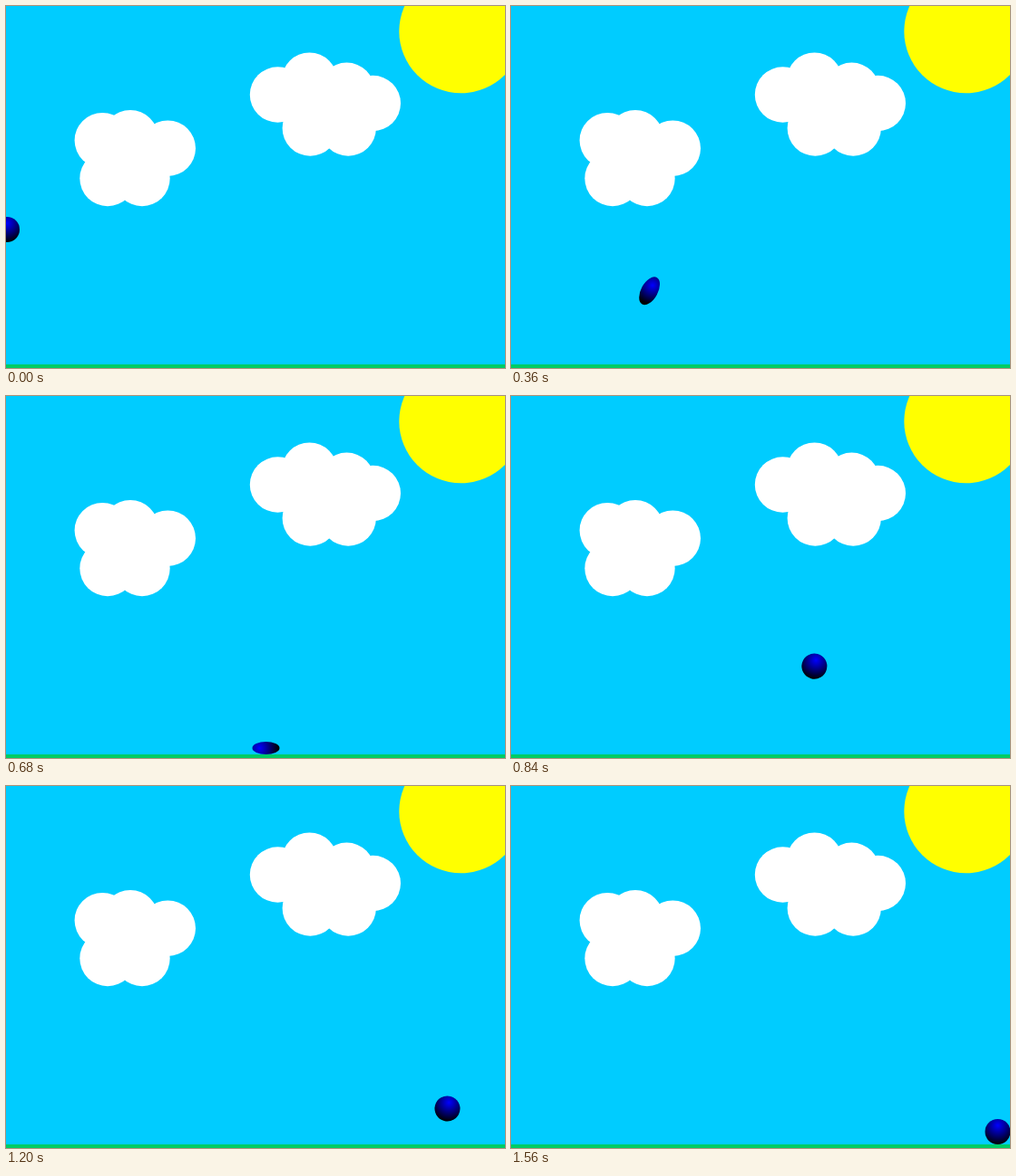
Write an HTML page that moves like this. It is 550 by 400 pixels and loops after 1.64 s.

```html
<!DOCTYPE html>
<html lang="en">
<head>
<meta charset="utf-8">
<title>Bouncing ball</title>
<style>
  html, body { margin: 0; width: 100%; height: 100%; overflow: hidden; background: #0cf; }
  svg { display: block; width: 550px; height: 400px; }
</style>
</head>
<body>
<svg viewBox="0 0 550 400">
  <defs>
    <radialGradient id="shade" gradientUnits="userSpaceOnUse" cx="0" cy="-7" r="21">
      <stop offset="0" stop-color="#00f"/>
      <stop offset="1" stop-color="#000"/>
    </radialGradient>
    <circle id="puff" r="30.7"/>
  </defs>
  <rect width="550" height="400" fill="#0cf"/>
  <circle cx="501.5" cy="28" r="68.2" fill="#ff0"/>
  <g fill="#fff">
    <use href="#puff" x="106.3" y="148.6"/>
    <use href="#puff" x="137" y="145.7"/>
    <use href="#puff" x="178.3" y="157.2"/>
    <use href="#puff" x="112" y="190.5"/>
    <use href="#puff" x="150" y="190.5"/>
    <use href="#puff" x="299.5" y="98"/>
    <use href="#puff" x="334.5" y="82.2"/>
    <use href="#puff" x="375.5" y="93.3"/>
    <use href="#puff" x="404.3" y="107.5"/>
    <use href="#puff" x="335.3" y="135"/>
    <use href="#puff" x="377.2" y="135"/>
  </g>
  <rect y="396" width="550" height="4" fill="#00cc66"/>
  <ellipse id="ball" fill="url(#shade)"/>
</svg>
<script>
const ball = document.getElementById('ball');
const TICK = 40, TICKS = 41, GROUND = 396, R = 14;

// start and end in ticks; peakAt and peakX are shares of the hop's time and width
const hops = [
  { start: 0, end: 6, poses: 6, from: 1, to: 116.6, height: 135, peakAt: 0, peakX: 0, tilt: 0, squashEnd: true },
  { start: 6, end: 17, poses: 11, from: 116.6, to: 286.5, height: 85, peakAt: .4, peakX: .311, tilt: 0, squashStart: true, squashEnd: true },
  { start: 17, end: 28, poses: 11, from: 286.5, to: 473.5, height: 85, peakAt: .332, peakX: .229, tilt: 15, squashStart: true },
  { start: 28, end: 39, poses: 7, from: 473.5, to: 536.5, height: 27, peakAt: .16, peakX: .231, tilt: 15 }
];

const mix = (a, b, p) => a + (b - a) * p;

function rise(hop, q) {
  const pose = { along: hop.peakX * q, lift: hop.height * (1 - (1 - q) ** 1.3), rx: R, ry: R, turn: hop.tilt };
  if (hop.squashStart) {
    pose.rx = mix(R / 2, R, q ** 3);
    pose.ry = mix(R + 1, R, q) + 3 * Math.sin(Math.PI * q);
    pose.turn = mix(90, hop.tilt, q);
  }
  return pose;
}

function fall(hop, q) {
  const squash = hop.squashEnd ? Math.max(0, q * 3 - 2) : 0;
  return {
    along: mix(hop.peakX, 1, q ** 1.1),
    lift: hop.height * (1 - q ** 1.3),
    rx: R * (1 - squash / 2),
    ry: R + squash,
    turn: hop.tilt * (1 - q ** 4) - 90 * squash
  };
}

function place(hop, { along, lift, rx, ry, turn }) {
  const a = turn * Math.PI / 180;
  const reach = Math.hypot(ry * Math.cos(a), rx * Math.sin(a));
  const x = mix(hop.from, hop.to, along), y = GROUND - lift - reach;
  ball.setAttribute('rx', rx);
  ball.setAttribute('ry', ry);
  ball.setAttribute('transform', `translate(${x} ${y}) rotate(${turn})`);
}

let begin;
function draw(now) {
  begin ??= now;
  const tick = Math.min(Math.floor((now - begin) / TICK) % TICKS, hops.at(-1).end);
  const hop = hops.find(h => tick <= h.end);
  const p = Math.floor((tick - hop.start) * hop.poses / (hop.end - hop.start)) / hop.poses;
  const peak = hop.peakAt;
  place(hop, p < peak ? rise(hop, p / peak) : fall(hop, (p - peak) / (1 - peak)));
  requestAnimationFrame(draw);
}
requestAnimationFrame(draw);
</script>
</body>
</html>
```
